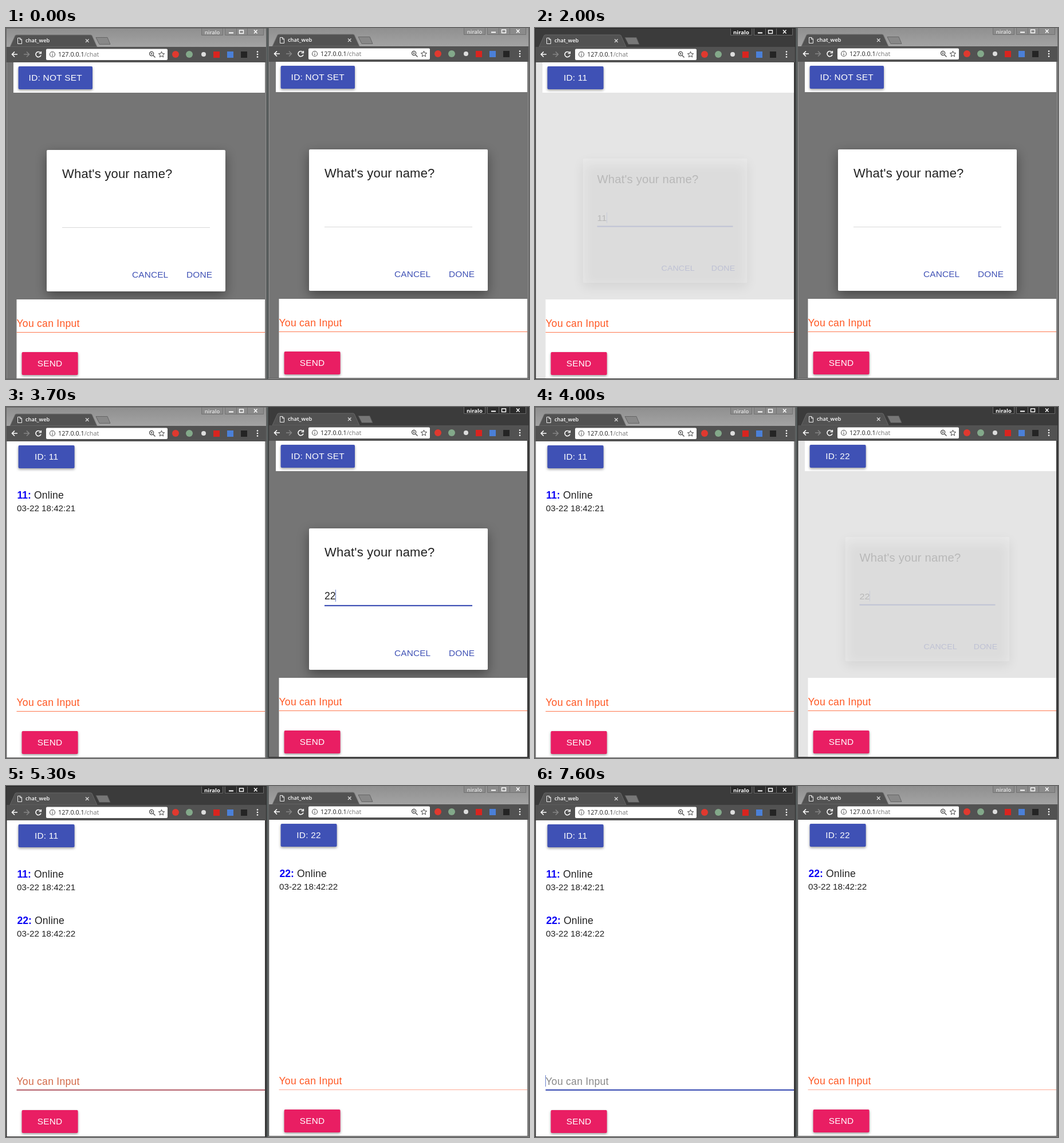
An HTML page with a canvas that plays this animation: 913 by 613 pixels, repeating every 8000 ms.

```html
<!DOCTYPE html>
<html lang="en">
<head>
<meta charset="utf-8">
<title>Two chat windows</title>
<style>
  html, body { margin: 0; width: 100%; height: 100%; overflow: hidden; background: #fff; }
  canvas { display: block; }
</style>
</head>
<body>
<canvas id="stage" width="913" height="613"></canvas>
<script>
const ctx = document.getElementById('stage').getContext('2d');
const LOOP = 8000, STEP = 100;
const PAGE_FONT = '"Liberation Sans", Arial, sans-serif';
const UI_FONT = '"Open Sans", "Noto Sans", sans-serif';
const BLUE = [63, 81, 181], ORANGE = [255, 87, 34], GRAY = [136, 136, 136], PALE = [216, 216, 216];
const LINE = [255, 118, 76], FADED_LINE = [255, 170, 148];
const INK = '#212121', CHROME = '#525252', CARET = '#6a82cc';

const clamp = v => Math.max(0, Math.min(1, v));
const rgb = c => `rgb(${c.map(Math.round)})`;
const mix = (a, b, p) => rgb(a.map((v, i) => v + (b[i] - v) * p));
// Eased progress of a transition that is first visible at `start`.
const progress = (t, start) => t < start ? 0 : 1 - (1 - clamp((t - start + 50) / 350)) ** 3;

function rect(x, y, w, h, fill) {
  ctx.fillStyle = fill;
  ctx.fillRect(x, y, w, h);
}

function shape(points, fill, stroke) {
  ctx.beginPath();
  points.forEach(([x, y]) => ctx.lineTo(x, y));
  ctx.closePath();
  if (fill) { ctx.fillStyle = fill; ctx.fill(); }
  if (stroke) { ctx.strokeStyle = stroke; ctx.lineWidth = 1; ctx.stroke(); }
}

function path(d, color, width = 1.5) {
  ctx.strokeStyle = color;
  ctx.lineWidth = width;
  ctx.stroke(new Path2D(d));
}

function disc(x, y, r, fill) {
  ctx.fillStyle = fill;
  ctx.beginPath();
  ctx.arc(x, y, r, 0, 7);
  ctx.fill();
}

function card(x, y, w, h, fill, blur, drop, alpha) {
  ctx.save();
  ctx.shadowColor = `rgba(0,0,0,${alpha})`;
  ctx.shadowBlur = blur;
  ctx.shadowOffsetY = drop;
  ctx.fillStyle = fill;
  ctx.beginPath();
  ctx.roundRect(x, y, w, h, 2);
  ctx.fill();
  ctx.restore();
}

// Draws text and returns its advance width.
function text(str, x, y, size, fill, { weight = 400, family = PAGE_FONT, spacing = 0, align = 'left' } = {}) {
  ctx.font = `${weight} ${size}px ${family}`;
  ctx.letterSpacing = spacing + 'px';
  ctx.textAlign = align;
  ctx.fillStyle = fill;
  ctx.fillText(str, x, y);
  return ctx.measureText(str).width;
}

function button(label, x, y, w, fill) {
  card(x, y, w, 40, fill, 4, 2, 0.38);
  text(label, x + w / 2, y + 25, 15.4, '#fff', { spacing: 0.25, align: 'center' });
}

function titleBar(active) {
  const line = active ? '#6a6a6a' : '#727272';
  if (active) rect(0, 0, 455, 33, '#3b3b3b');
  else {
    const shade = ctx.createLinearGradient(0, 0, 0, 33);
    shade.addColorStop(0, '#8f8f8f');
    shade.addColorStop(1, '#a3a3a3');
    rect(0, 0, 455, 33, shade);
  }
  rect(0, 0, 455, 1, active ? '#222' : '#666');

  const box = (x, w) => {
    rect(x, 1, w, 12, active ? '#2b2b2b' : '#8b8b8b');
    path(`M${x + .5} 1V12.5H${x + w - .5}V1`, line, 1);
  };
  box(341, 38);
  box(382, 21);
  box(402, 20);
  box(421, 29);
  text('niralo', 360, 10.5, 9.5, active ? '#fff' : '#e6e6e6',
    { weight: active ? 700 : 600, family: UI_FONT, align: 'center' });
  path('M389 8.5H397', '#fff', 2);
  path('M407.5 4H414.5V9.5H407.5Z', '#fff', 1.4);
  path('M433 3.5L438.5 9.5M438.5 3.5L433 9.5', '#fff', 1.4);

  shape([[7, 33], [16, 13], [18, 12], [148, 12], [150, 13], [159, 33]], CHROME, active ? '#666' : '#777');
  shape([[157, 16.5], [177, 16.5], [182, 28.5], [163, 28.5]], active ? '#777' : '#888', active ? '#555' : '#666');
  path('M20.5 17.5H25L27.5 20V27.5H20.5ZM24.5 17.5V20.5H27.5', '#eee', 1);
  text('chat_web', 34, 25, 9.3, '#fff', { weight: 600, family: UI_FONT });
  path('M139 19.5L144.5 25M144.5 19.5L139 25', '#ddd', 1.2);
}

function toolbar() {
  rect(1, 33, 453, 27, CHROME);
  path('M20 46H10.5M15 41.5L10.5 46L15 50.5', '#fff', 1.6);
  path('M31 46H40.5M36 41.5L40.5 46L36 50.5', '#858585', 1.5);
  path('M60 43A4.6 4.6 0 1 0 61 47.5M61.3 41V44.5H57.5', '#fff', 1.6);
  ctx.fillStyle = '#fff';
  ctx.beginPath();
  ctx.roundRect(70, 36.5, 212, 19.5, 2);
  ctx.fill();
  path('M76.5 46A4.5 4.5 0 1 0 85.5 46A4.5 4.5 0 1 0 76.5 46M81 45.5V49M81 43V44.3', '#555', 1.1);
  const hostWidth = text('127.0.0.1', 91, 50, 10.8, '#222', { family: UI_FONT });
  text('/chat', 91 + hostWidth, 50, 10.8, '#777', { family: UI_FONT });
  path('M250.5 45A3.6 3.6 0 1 0 257.7 45A3.6 3.6 0 1 0 250.5 45M257 48L260.5 51.5M252.5 45H255.7M254.1 43.4V46.6', '#444', 1.2);
  const star = Array.from({ length: 10 }, (_, i) => {
    const a = i * Math.PI / 5 - Math.PI / 2, r = i % 2 ? 2.4 : 5.4;
    return [271.5 + r * Math.cos(a), 46.5 + r * Math.sin(a)];
  });
  shape(star, null, '#444');
  disc(296, 46, 6, '#e0392f');
  disc(320, 46, 6, '#83a98a');
  disc(345, 46, 4, '#ddd');
  rect(362, 41, 11, 11, '#d9241f');
  rect(386, 41, 11, 11, '#4b80d8');
  rect(410, 41, 11, 11, '#242424');
  for (const y of [41.5, 46, 50.5]) disc(439, y, 1.3, '#fff');
}

function message(name, seconds, y) {
  const w = text(name + ':', 19.5, y, 17.6, '#0a00f5', { weight: 700 });
  text('Online', 19.5 + w + 5, y, 17.6, INK, { spacing: 0.2 });
  text('03-22 18:42:' + seconds, 19, y + 22, 15.2, INK);
}

function dialog(s) {
  const left = 1 - s.closing;
  ctx.save();
  ctx.globalAlpha = left;
  ctx.translate(227, 336.5);
  ctx.scale(0.9 + 0.1 * left, 0.85 + 0.15 * left);
  ctx.translate(-227, -336.5);
  card(71, 213, 312, 247, '#fff', 20, 7, 0.4);
  text("What's your name?", 98, 262, 22, INK, { spacing: 0.22 });
  rect(98, s.focus ? 346.8 : 348, 258, s.focus ? 2.2 : 1, mix(PALE, BLUE, s.focus));
  if (s.typed) {
    const w = text(s.typed, 98, 337, 17.6, INK);
    rect(Math.floor(98 + w), 320, 1, 21, CARET);
  }
  text('CANCEL', 220, 436, 15.4, rgb(BLUE), { spacing: 0.15 });
  text('DONE', 315, 436, 15.4, rgb(BLUE), { spacing: 0.15 });
  ctx.restore();
}

function pane(x, y, s) {
  ctx.save();
  ctx.translate(x, y);
  rect(0, 0, 455, 614, s.active ? '#434343' : '#8c8c8c');
  titleBar(s.active);
  toolbar();
  rect(1.5, 60, 450.5, 552, '#fff');

  s.messages.forEach(([name, seconds], i) => message(name, seconds, 160 + 81 * i));
  if (s.closing < 1) {
    rect(1.5, 60, 450.5, 552, `rgba(0,0,0,${0.54 * (1 - s.closing)})`);
    dialog(s);
    // Header and footer stay above the backdrop and the dialog's shadow.
    rect(13, 60, 439, 53, '#fff');
    rect(18.5, 474, 433.5, 138, '#fff');
  }

  const named = s.id !== 'NOT SET';
  button('ID: ' + s.id, 21.6, 67, named ? 98 : 129.4, rgb(BLUE));
  text('You can Input', 18.5, 522, 17.6, mix(ORANGE, GRAY, s.input), { spacing: 0.25 });
  rect(18.5, s.input ? 529.8 : 531, 433.5, s.input ? 2.2 : 1, mix(s.line, BLUE, s.input));
  if (s.caret) rect(18, 505, 1, 20, CARET);
  button('SEND', 27.6, 566, 98, '#e91e63');

  rect(0, 0, 1, 613, s.active ? '#2c2c2c' : '#666');
  rect(452, 60, 1, 553, s.active ? '#333' : '#777');
  rect(454, 0, 1, 613, s.active ? '#2c2c2c' : '#666');
  rect(0, 612, 455, 1, s.active ? '#333' : '#666');
  ctx.restore();
}

const typedAt = (t, first, second, digit) => digit.repeat((t >= first) + (t >= second));

function draw(t) {
  rect(0, 0, 913, 613, '#565c5c');
  const first = ['11', '21'], second = ['22', '22'];
  const joined = t >= 4200;
  pane(0, 0, {
    active: (t >= 900 && t < 3000) || t >= 5300,
    id: t < 1900 ? 'NOT SET' : '11',
    focus: progress(t, 900),
    typed: typedAt(t, 1500, 1600, '1'),
    closing: progress(t, 1900),
    messages: [...(t >= 3400 ? [first] : []), ...(joined ? [second] : [])],
    input: progress(t, 5300),
    line: LINE,
    caret: t >= 5600 && Math.floor((t - 5600) / 500) % 2 === 0
  });
  pane(458, -1, {
    active: t >= 3000 && t < 5300,
    id: t < 3900 ? 'NOT SET' : '22',
    focus: progress(t, 3000),
    typed: typedAt(t, 3500, 3700, '2'),
    closing: progress(t, 3900),
    messages: joined ? [second] : [],
    input: 0,
    line: t < 5300 ? LINE : FADED_LINE,
    caret: false
  });
}

function tick() {
  const t = performance.now() % LOOP;
  draw(Math.floor(t / STEP) * STEP);
  requestAnimationFrame(tick);
}
tick();
</script>
</body>
</html>
```
